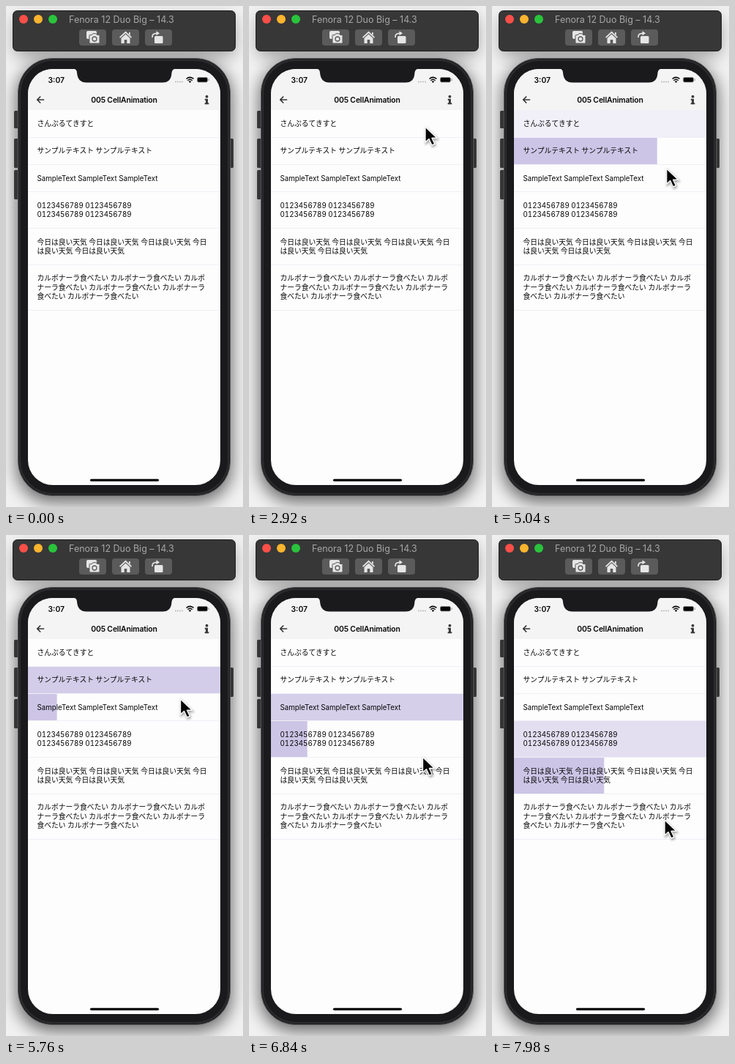
Recreate the animation shown at these times as an HTML page. Size 324x684 px, loop 8000 ms.

```html
<!DOCTYPE html>
<html lang="ja">
<head>
<meta charset="utf-8">
<title>Cell animation</title>
<style>
  html, body { margin: 0; width: 100%; height: 100%; overflow: hidden; background: #f1f1f2; }
  svg { display: block; width: 324px; height: 684px; }
  text { font-family: Inter, "Noto Sans CJK JP", "Noto Sans CJK", sans-serif; fill: #060607; }
  .cell { font-size: 9.75px; font-variant-numeric: tabular-nums; }
  .bold { font-weight: 600; font-size: 10.4px; }
  .window-title { font-size: 12.5px; fill: #a6a6a7; }
  .icon { fill: #e6e6e7; }
  .line { fill: none; stroke: #333335; stroke-width: 1.7; stroke-linecap: round; stroke-linejoin: round; }
</style>
</head>
<body>
<svg viewBox="0 0 324 684">
  <defs>
    <filter id="soft" x="-30%" y="-30%" width="160%" height="160%">
      <feGaussianBlur stdDeviation="11"/>
    </filter>
    <filter id="glow" x="-50%" y="-50%" width="200%" height="200%">
      <feGaussianBlur stdDeviation="1.5"/>
    </filter>
    <clipPath id="screen"><rect x="30" y="86" width="263" height="568" rx="34"/></clipPath>
    <path id="arrow" d="M0 0V21L5 16.5L9 25L12.8 23.3L9 15.3H16Z"/>
  </defs>

  <rect width="324" height="684" fill="#f1f1f2"/>
  <rect x="14" y="76" width="295" height="602" rx="48" opacity=".55" filter="url(#soft)"/>
  <rect x="12" y="16" width="300" height="52" rx="6" opacity=".35" filter="url(#soft)"/>

  <!-- Window bar -->
  <rect x="9.5" y="6.5" width="304" height="55" rx="6" fill="#373738" stroke="#1c1c1d"/>
  <circle cx="24" cy="18" r="6" fill="#fb4f48"/>
  <circle cx="44" cy="18" r="6" fill="#fbb42e"/>
  <circle cx="64" cy="18" r="6" fill="#2ac43c"/>
  <text class="window-title" x="86" y="22.7">Fenora 12 Duo Big – 14.3</text>
  <g fill="#5b5b5c">
    <rect x="100" y="32" width="37" height="22" rx="4"/>
    <rect x="145" y="32" width="37" height="22" rx="4"/>
    <rect x="190" y="32" width="37" height="22" rx="4"/>
  </g>
  <g class="icon">
    <rect x="110" y="34" width="14" height="11" rx="2"/>
    <path d="M115 39.5h2.5l1.2-1.8h4.6l1.2 1.8h2.5q1 0 1 1v9.5q0 1-1 1h-12q-1 0-1-1v-9.5q0-1 1-1z" stroke="#5b5b5c"/>
    <circle cx="121" cy="45" r="3" fill="none" stroke="#5b5b5c" stroke-width="1.3"/>
    <path d="M163.5 34.5L172 42.5L170.8 43.8L163.5 37L156.2 43.8L155 42.5ZM157.5 44L163.5 38.5L169.5 44V51H165.3V46H161.7V51H157.5Z"/>
    <path d="M168 36h1.8v4l-1.8-1.6z"/>
    <rect x="203" y="41" width="11.5" height="10" rx="1.5"/>
    <path d="M200 43Q199.500 37.300 206 37.300" fill="none" stroke="#e6e6e7" stroke-width="1.700"/>
    <path d="M205.500 34.300L210 37.300L205.500 40.300Z"/>
  </g>

  <!-- Phone body -->
  <g fill="#363637">
    <rect x="11" y="143" width="8" height="24" rx="1.5"/>
    <rect x="11" y="181" width="8" height="40" rx="1.5"/>
    <rect x="11" y="224" width="8" height="40" rx="1.5"/>
    <rect x="303" y="181" width="8" height="40" rx="1.5"/>
  </g>
  <rect x="16.5" y="71.5" width="290" height="597" rx="47" fill="#1a1a1c" stroke="#555557"/>
  <rect x="19" y="74" width="285" height="592" rx="45" fill="none" stroke="#2c2c2e" stroke-width="2"/>

  <g clip-path="url(#screen)">
    <rect x="30" y="86" width="263" height="568" fill="#fdfdfd"/>
    <rect x="30" y="86" width="263" height="56" fill="#f4f4f5"/>
    <g id="fills" fill="#cdc5e6"></g>
    <g id="rules" fill="#f0eff8"></g>
    <g id="labels"></g>
  </g>
  <path d="M91 85Q97 86 97 91Q98 104.5 110 104.5H214Q226 104.5 226.5 91Q227 86 233 85Z" fill="#1a1a1c"/>

  <!-- Status and navigation bars -->
  <text class="bold" x="57.5" y="104.7">3:07</text>
  <g fill="#b4b4b6">
    <circle cx="232" cy="103.5" r=".9"/><circle cx="235" cy="103.5" r=".9"/>
    <circle cx="238" cy="103.5" r=".9"/><circle cx="241" cy="103.5" r=".9"/>
  </g>
  <path d="M246.5 99.5Q251.5 95.3 256.5 99.5M248.3 101.7Q251.5 98.9 254.7 101.7" fill="none" stroke="#060607" stroke-width="1.5"/>
  <path d="M249.7 103L251.5 104.9L253.3 103Q251.5 101.5 249.7 103Z"/>
  <rect x="261.5" y="97.5" width="14" height="6.5" rx="1.8" fill="#060607" stroke="#8a8a8c" stroke-width=".8"/>
  <rect x="276.7" y="99.5" width="1" height="2.5" fill="#8a8a8c"/>
  <path class="line" d="M51.5 128H43M46.7 124L42.7 128L46.7 132"/>
  <text class="bold" x="161.5" y="132" text-anchor="middle" letter-spacing="-.15">005 CellAnimation</text>
  <g fill="#3a3a3c">
    <circle cx="274.5" cy="123.7" r="1.9"/>
    <path d="M271.8 126.8H276V132.3H277.3V134.2H271.7V132.3H273V128.7H271.8Z"/>
  </g>

  <rect x="115" y="645.7" width="94" height="3.2" rx="1.6"/>

  <g id="cursor">
    <use href="#arrow" fill="#555" stroke="#555" stroke-width="2" opacity=".5" transform="translate(1 2)" filter="url(#glow)"/>
    <use href="#arrow" fill="#060607" stroke="#fafafa" stroke-width="1.4" stroke-linejoin="round"/>
  </g>
</svg>

<script>
  const LOOP = 8000, SELECT = 800;
  const LEFT = 30, WIDTH = 263, LINE_HEIGHT = 12.4;

  // start: when the cell is tapped, in ms; the next tap deselects it
  const cells = [
    { top: 142, bottom: 179, start: 3465, lines: ["さんぷるてきすと"] },
    { top: 179, bottom: 216.5, start: 4511, lines: ["サンプルテキスト サンプルテキスト"] },
    { top: 216.5, bottom: 253.5, start: 5558, lines: ["SampleText SampleText SampleText"] },
    { top: 253.5, bottom: 303.5, start: 6612, lines: ["0123456789 0123456789", "0123456789 0123456789"] },
    { top: 303.5, bottom: 353, start: 7597, lines: [
      "今日は良い天気 今日は良い天気 今日は良い天気 今日", "は良い天気 今日は良い天気"] },
    { top: 353, bottom: 415, start: Infinity, lines: [
      "カルボナーラ食べたい カルボナーラ食べたい カルボ",
      "ナーラ食べたい カルボナーラ食べたい カルボナーラ",
      "食べたい カルボナーラ食べたい"] }
  ];

  // time, x, y of the pointer tip
  const pointerPath = [
    [2350, 330, 215], [2800, 241, 165], [3680, 241, 165], [4020, 240.5, 194],
    [4750, 240.5, 194], [5100, 238.5, 224], [5790, 238.5, 224], [6200, 238, 270],
    [6650, 238, 270], [7030, 237, 336], [7650, 237, 336], [7960, 236, 389], [LOOP, 236, 389]
  ];

  const byId = id => document.getElementById(id);

  function add(parent, tag, attributes, content = "") {
    const node = document.createElementNS("http://www.w3.org/2000/svg", tag);
    for (const name in attributes) node.setAttribute(name, attributes[name]);
    node.textContent = content;
    return byId(parent).appendChild(node);
  }

  for (const cell of cells) {
    const { top, bottom, lines } = cell;
    cell.fill = add("fills", "rect", { x: LEFT, y: top, width: 0, height: bottom - top });
    add("rules", "rect", { x: LEFT, y: Math.floor(bottom), width: WIDTH, height: 1 });
    const firstBaseline = (top + bottom) / 2 + 3.6 - (lines.length - 1) * LINE_HEIGHT / 2;
    lines.forEach((line, i) =>
      add("labels", "text", { class: "cell", x: 42.5, y: firstBaseline + i * LINE_HEIGHT }, line));
  }

  const ease = p => 0.5 - 0.5 * Math.cos(Math.PI * Math.min(1, Math.max(0, p)));

  function movePointer(time) {
    const cursor = byId("cursor");
    const next = pointerPath.findIndex(point => point[0] > time);
    cursor.style.display = next > 0 ? "" : "none";
    if (next < 1) return;
    const [t0, x0, y0] = pointerPath[next - 1], [t1, x1, y1] = pointerPath[next];
    const p = ease((time - t0) / (t1 - t0));
    cursor.setAttribute("transform", `translate(${x0 + (x1 - x0) * p} ${y0 + (y1 - y0) * p})`);
  }

  function draw() {
    const time = performance.now() % LOOP;
    const selected = cells.map(cell => ease((time - cell.start) / SELECT));
    cells.forEach(({ fill }, i) => {
      fill.setAttribute("width", WIDTH * selected[i]);
      fill.setAttribute("opacity", 1 - (selected[i + 1] || 0));
    });
    movePointer(time);
    requestAnimationFrame(draw);
  }
  draw();
</script>
</body>
</html>
```
